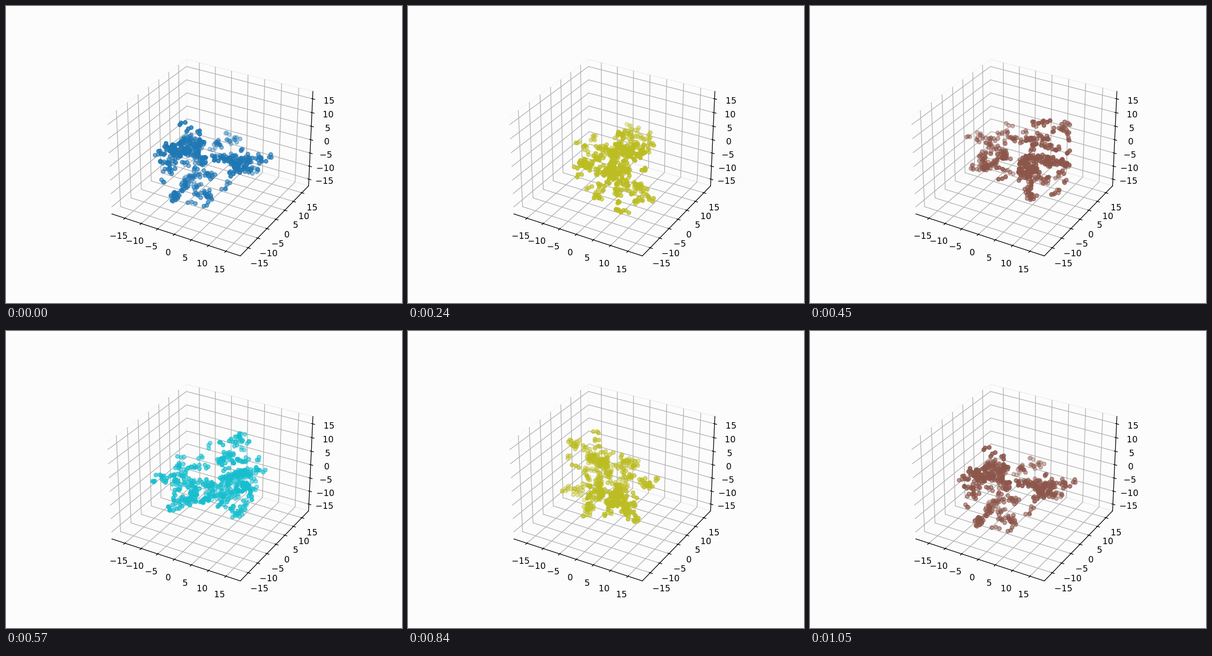
A matplotlib script that plays this animation: 864x648 px, repeating every 1.08 s.

```python
import numpy as np
import matplotlib.pyplot as plt
from matplotlib.animation import FuncAnimation

FRAMES = 36
CHAINS, LINKS = 170, 3
STEP = 1.05
PAPER = "#fcfcfc"

# Outermost points of the cluster: radius, bearing in degrees, height
TIPS = [(8, 235, 15), (14, 248, 8), (14, 215, 0), (15.5, 257, -10),
        (13, 230, -15), (8, 294, -14), (11.5, -26, 2), (16.5, 17, 0),
        (12, 41, -9), (12, 105, 1), (12.5, 165, 0), (8, 175, -13)]


def grow_cluster(rng):
    """Fill fans between neighbouring tips with short random chains."""
    radius, bearing, height = np.transpose(TIPS)
    angle = np.radians(bearing)
    tips = np.column_stack([radius * np.cos(angle), radius * np.sin(angle), height])
    gaps = np.linalg.norm(tips[:, None] - tips, axis=2)
    near = np.argsort(gaps, axis=1)[:, 1:5]

    i = np.arange(CHAINS) % len(tips)
    j = near[i, rng.integers(0, 4, CHAINS)]
    mix = rng.beta(0.7, 0.7, (CHAINS, 1))
    reach = np.sqrt(rng.uniform(0.03, 1, (CHAINS, 1)))
    starts = reach * (mix * tips[i] + (1 - mix) * tips[j])

    steps = rng.normal(size=(LINKS, CHAINS, 3))
    steps *= STEP / np.linalg.norm(steps, axis=2, keepdims=True)
    steps[0] = 0
    return (starts + np.cumsum(steps, axis=0)).reshape(-1, 3)


def turn(points, angle):
    x, y, z = points.T
    c, s = np.cos(angle), np.sin(angle)
    return x * c - y * s, x * s + y * c, z


points = grow_cluster(np.random.default_rng(4))

fig = plt.figure(figsize=(6.4, 4.8), dpi=135, facecolor=PAPER)
ax = fig.add_subplot(projection="3d", facecolor=PAPER)

clouds = [ax.scatter(*turn(points, angle), color=f"C{i % 10}", visible=i == 0)
          for i, angle in enumerate(np.linspace(0, 2 * np.pi, FRAMES))]

ax.set(xlim=(-19.07, 19.07), ylim=(-19.07, 19.07), zlim=(-17.6, 17.65))
for axis in (ax.xaxis, ax.yaxis, ax.zaxis):
    axis.set_ticks(range(-15, 16, 5))
    axis.pane.set_fill(False)


def update(frame):
    for i, cloud in enumerate(clouds):
        cloud.set_visible(i == frame)
    return clouds


anim = FuncAnimation(fig, update, frames=FRAMES, interval=30, repeat=True,
                     repeat_delay=0, blit=False)
plt.show()
```
